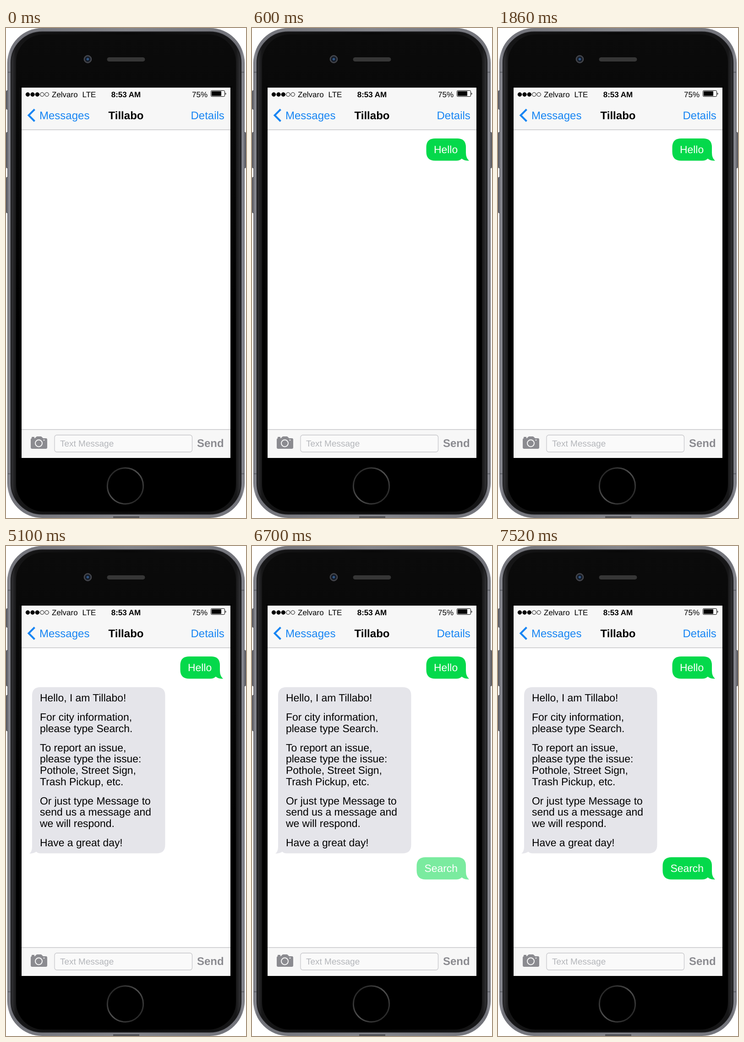
Animation, 524 px wide and 1069 px high, one loop 8000 ms. Source, as an HTML page:

```html
<!DOCTYPE html>
<html lang="en">
<head>
<meta charset="utf-8">
<title>Text message conversation</title>
<style>
  html, body { margin: 0; width: 100%; height: 100%; overflow: hidden; background: #fff; }
  svg { display: block; width: 524px; height: 1069px; }
  text { font-family: "Liberation Sans", Arial, sans-serif; white-space: pre; text-rendering: geometricPrecision; }
  .status { font-size: 17px; }
  .nav { font-size: 24px; }
  .message { font-size: 22.9px; }
  .bold { font-weight: bold; }
  .blue { fill: #1785f3; }
  .gray { fill: #8b8b90; }
</style>
</head>
<body>
<svg viewBox="0 0 524 1069">
  <defs>
    <linearGradient id="rim">
      <stop offset="0" stop-color="#5a5b61"/>
      <stop offset=".006" stop-color="#8c8d95"/>
      <stop offset=".016" stop-color="#72737a"/>
      <stop offset=".5" stop-color="#85868c"/>
      <stop offset=".984" stop-color="#72737a"/>
      <stop offset=".994" stop-color="#8c8d95"/>
      <stop offset="1" stop-color="#5a5b61"/>
    </linearGradient>
    <linearGradient id="edge">
      <stop offset="0" stop-color="#343437"/>
      <stop offset=".022" stop-color="#161617"/>
      <stop offset=".5" stop-color="#080808"/>
      <stop offset=".978" stop-color="#161617"/>
      <stop offset="1" stop-color="#343437"/>
    </linearGradient>
    <linearGradient id="glass" x2="0" y2="1">
      <stop offset="0" stop-color="#0b0b0b"/>
      <stop offset=".6" stop-color="#000"/>
    </linearGradient>
    <linearGradient id="ring" x2="1" y2="1">
      <stop offset="0" stop-color="#191919"/>
      <stop offset=".5" stop-color="#505050"/>
      <stop offset="1" stop-color="#191919"/>
    </linearGradient>
    <pattern id="mesh" width="3" height="3" patternUnits="userSpaceOnUse">
      <rect width="3" height="3" fill="#474747"/>
      <path d="M0 0h1.5v1.5h-1.5zM1.5 1.5h1.5v1.5h-1.5z" fill="#252525"/>
    </pattern>
  </defs>

  <!-- phone -->
  <g fill="#6e6f77" stroke="#3d3e43">
    <rect x=".5" y="136.500" width="6" height="41" rx="2"/>
    <rect x=".5" y="227.500" width="6" height="78" rx="2"/>
    <rect x=".5" y="325.500" width="6" height="78" rx="2"/>
    <rect x="517.500" y="227.500" width="6" height="78" rx="2"/>
  </g>
  <rect x="3" width="518" height="1069" rx="76" fill="url(#rim)"/>
  <path d="M3 96.500h9M512 96.500h9M3 972.500h9M512 972.500h9" stroke="#5f6067" stroke-width="2"/>
  <rect x="11" y="8.500" width="502" height="1052" rx="68" fill="url(#edge)" stroke="#1b1b1d" stroke-width="2"/>
  <rect x="22" y="14" width="480" height="1041" rx="60" fill="url(#glass)"/>
  <path d="M234 1067h57" stroke="#46474c" stroke-width="3"/>
  <circle cx="178.500" cy="68" r="8.300" fill="#3f4147" stroke="#505157"/>
  <circle cx="178.500" cy="68" r="6" fill="#131a26"/>
  <circle cx="178.500" cy="68" r="2.800" fill="#2f5584"/>
  <rect x="221" y="64.500" width="82" height="8" rx="4" fill="url(#mesh)" stroke="#3a3a3a"/>
  <circle cx="260.500" cy="999" r="39.200" fill="#000" stroke="url(#ring)" stroke-width="3"/>

  <!-- screen -->
  <rect x="31" y="127" width="462" height="815" fill="#000"/>
  <rect x="34" y="130" width="456" height="808" fill="#fff"/>
  <path d="M34 130h456v92h-456zM34 876h456v62h-456z" fill="#f7f7f7"/>
  <path d="M34 222h456M34 876h456" stroke="#c6c6c9" stroke-width="1.500"/>

  <!-- status and title bars -->
  <g stroke="#000">
    <circle cx="47.500" cy="145" r="4.200"/>
    <circle cx="58" cy="145" r="4.200"/>
    <circle cx="68.300" cy="145" r="4.200"/>
    <circle cx="78.800" cy="145" r="4.200" fill="none"/>
    <circle cx="89.200" cy="145" r="4.200" fill="none"/>
    <rect x="447.500" y="136.500" width="30" height="13" rx="2" fill="none"/>
  </g>
  <path d="M449 138h21v10h-21zM479 141q3 2 0 5z"/>
  <text class="status" x="100" y="150.500">Zelvaro</text>
  <text class="status" x="166.500" y="150.500">LTE</text>
  <text class="status bold" x="262" y="150.500" text-anchor="middle">8:53 AM</text>
  <text class="status" x="406" y="150.500">75%</text>
  <path d="M62.500 177.500L49.500 190.500 62.500 203.500" fill="none" stroke="#1785f3" stroke-width="4"/>
  <text class="nav blue" x="73" y="199">Messages</text>
  <text class="nav bold" x="262" y="198.500" text-anchor="middle">Tillabo</text>
  <text class="nav blue" x="403.500" y="199">Details</text>

  <!-- input bar -->
  <path class="gray" d="M56 895v-2q0-1 1-1h4q1 0 1 1v2h1l3-3q1-1 2-1h8q1 0 2 1l3 3h6q3 0 3 3v17q0 3-3 3h-30q-3 0-3-3v-17q0-3 3-3z"/>
  <circle cx="71.500" cy="906" r="7.500" fill="none" stroke="#f7f7f7" stroke-width="2"/>
  <circle cx="83" cy="899" r="1.300" fill="#f7f7f7"/>
  <rect x="106" y="888" width="300.500" height="37" rx="5" fill="#fafafa" stroke="#c8c8cc" stroke-width="1.300"/>
  <text x="118" y="912.500" font-size="19" fill="#b4b6ba">Text Message</text>
  <text class="nav bold gray" x="417" y="914">Send</text>

  <!-- conversation -->
  <g id="hello">
    <path fill="#04d94b" d="M400 241H448Q467 241 467 260V272Q467 284 474 289.500Q464 290 458 285Q453 289.500 446 289.500H400Q380.500 289.500 380.500 270V260Q380.500 241 400 241Z"/>
    <text class="message" x="397" y="273" fill="#fff">Hello</text>
  </g>
  <g id="reply">
    <path fill="#e5e5ea" d="M75 308H329Q347.500 308 347.500 326V652Q347.500 670.500 329 670.500H75Q70 670.500 66 667Q60 671 51 671Q57 667 57 656V326Q57 308 75 308Z"/>
  </g>
  <g id="search">
    <path fill="#04d94b" d="M379 679H448Q467 679 467 698V710Q467 722 474 727.500Q464 728 458 723Q453 727.500 446 727.500H379Q359.500 727.500 359.500 708V698Q359.500 679 379 679Z"/>
    <text class="message" x="376.500" y="711" fill="#fff">Search</text>
  </g>
</svg>
<script>
const LOOP = 8000, LINE = 24.65, GAP = 17.4;
const [hello, reply, search] = ["hello", "reply", "search"].map(id => document.getElementById(id));

const paragraphs = [
  ["Hello, I am Tillabo!"],
  ["For city information,", "please type Search."],
  ["To report an issue,", "please type the issue:", "Pothole, Street Sign,", "Trash Pickup, etc."],
  ["Or just type Message to", "send us a message and", "we will respond."],
  ["Have a great day!"]
];

let baseline = 339;
for (const lines of paragraphs) {
  for (const line of lines) {
    const text = document.createElementNS("http://www.w3.org/2000/svg", "text");
    text.setAttribute("class", "message");
    text.setAttribute("x", 74);
    text.setAttribute("y", baseline);
    text.textContent = line;
    reply.append(text);
    baseline += LINE;
  }
  baseline += GAP;
}

// Sent bubbles show half faded for 100 ms before turning solid.
const sentOpacity = (time, start) => time < start ? 0 : time < start + 100 ? 0.53 : 1;

function showSent(bubble, time, start) {
  const [shape, label] = bubble.children;
  shape.setAttribute("fill-opacity", sentOpacity(time, start));
  label.setAttribute("fill-opacity", time < start ? 0 : 1);
}

const origin = performance.now();
function draw() {
  const time = (performance.now() - origin) % LOOP;
  showSent(hello, time, 500);
  showSent(search, time, 6700);
  reply.setAttribute("opacity", time < 2700 ? 0 : 1);
  requestAnimationFrame(draw);
}
draw();
</script>
</body>
</html>
```
